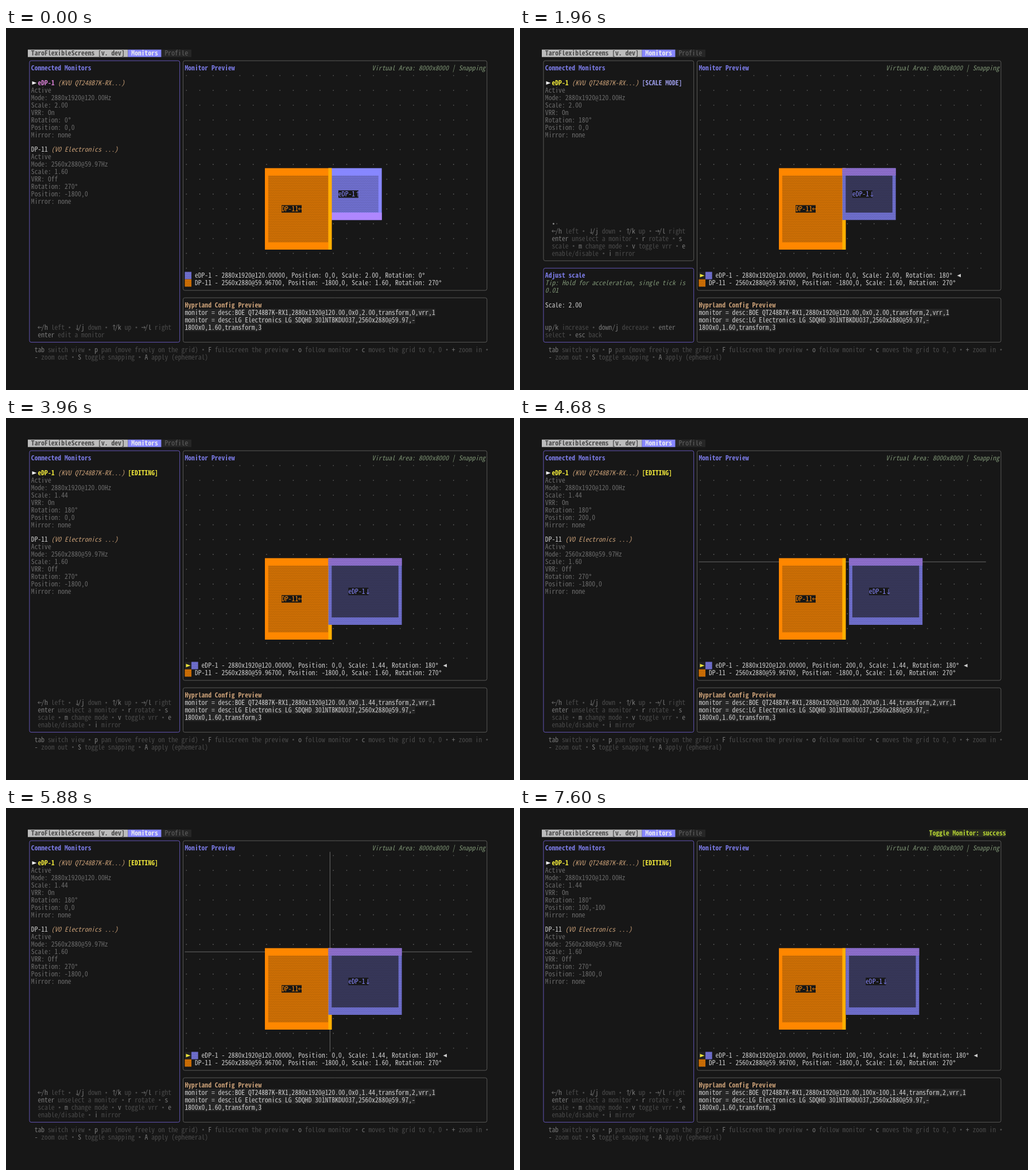
Recreate the animation shown at these times as an HTML page with a canvas. Size 885 by 632 pixels, loop 8000 ms.

```html
<!DOCTYPE html>
<html lang="en">
<head>
<meta charset="utf-8">
<title>Monitor layout</title>
<style>
  html, body { margin: 0; width: 100%; height: 100%; overflow: hidden; background: #171717; }
  canvas { display: block; }
</style>
</head>
<body>
<canvas id="stage" width="885" height="632"></canvas>
<script>
const ctx = document.getElementById('stage').getContext('2d');
const LOOP = 8000;

// Terminal grid
const CW = 5.8175, RH = 12.934, X0 = 38, Y0 = 37.73;
const colX = c => X0 + c * CW;
const rowY = r => Y0 + r * RH;
const midY = r => rowY(r) + RH / 2;

const BG = '#171717', WHITE = '#cecece', GRAY = '#6c6c6c', LINE = '#585856', ACTIVE = '#6355b4';
const BLUE = '#8787ff', VIOLET = '#af87ff', ORANGE = '#ff8700', AMBER = '#ffaf00';
const TITLE = '#7b7be6', TAN = '#c69d75', GREEN = '#7c9273', YELLOW = '#ece43a', KEY = '#787878', DESC = '#4a4a4a';

// Font size follows from the cell width
const FAMILY = '"Noto Sans Mono CJK JP", "Noto Sans Mono", "Liberation Mono", monospace';
ctx.font = '100px ' + FAMILY;
const SIZE = CW / (ctx.measureText('M').width / 100);

const ARROWS = { '→': 0, '↓': 1, '←': 2, '↑': 3 };

function arrow(ch, x, y) {
  const turn = ARROWS[ch], flat = turn % 2 === 0, half = flat ? 3.4 : 4.4;
  ctx.save();
  ctx.translate(x + (flat ? 3.6 : 4.8), y);
  ctx.rotate(turn * Math.PI / 2);
  ctx.beginPath();
  ctx.moveTo(-half, 0);
  ctx.lineTo(half, 0);
  ctx.moveTo(half - 2.4, -2.2);
  ctx.lineTo(half, 0);
  ctx.lineTo(half - 2.4, 2.2);
  ctx.stroke();
  ctx.restore();
}

function dot(x, y, r, open) {
  ctx.beginPath();
  ctx.arc(x, y, r, 0, 7);
  open ? ctx.stroke() : ctx.fill();
}

function glyph(ch, x, y) {
  if (ch in ARROWS) arrow(ch, x, y);
  else if (ch === '•') dot(x + CW / 2, y, 1.5);
  else if (ch === '◦') dot(x + CW / 2, y, 1.1);
  else if (ch === '°') dot(x + CW / 2, y - 3, 1.3, true);
  else if (ch !== ' ') ctx.fillText(ch, x, y + 4.1);
}

function text(c, r, str, color, style = '') {
  ctx.font = `${style} ${SIZE}px ${FAMILY}`;
  ctx.fillStyle = ctx.strokeStyle = color;
  ctx.lineWidth = 0.9;
  [...str].forEach((ch, i) => glyph(ch, colX(c + i), midY(r)));
}

function cells(c, r, w, h, fill) {
  ctx.fillStyle = fill;
  ctx.fillRect(colX(c), rowY(r), w * CW, h * RH);
}

function boxed(c, r, str, color, back, style) {
  cells(c, r, str.length, 1, back);
  text(c, r, str, color, style);
}

// Words between backticks are keys
function help(c, r, str) {
  str.split('`').forEach((part, i) => {
    text(c, r, part, i % 2 ? KEY : DESC);
    c += part.length;
  });
}

function panel(c1, r1, c2, r2, color) {
  ctx.strokeStyle = color;
  ctx.lineWidth = 1;
  ctx.beginPath();
  ctx.roundRect(colX(c1 + 0.5), midY(r1), (c2 - c1) * CW, (r2 - r1) * RH, 3);
  ctx.stroke();
}

function triangle(x, y, w, color) {
  ctx.fillStyle = color;
  ctx.beginPath();
  ctx.moveTo(x, y - 3);
  ctx.lineTo(x + w, y);
  ctx.lineTo(x, y + 3);
  ctx.fill();
}

function rule(x1, y1, x2, y2) {
  ctx.strokeStyle = '#6a6a6a';
  ctx.lineWidth = 1;
  ctx.beginPath();
  ctx.moveTo(x1, y1);
  ctx.lineTo(x2, y2);
  ctx.stroke();
}

// Shaded cells: a tint of the colour with faint zigzag rows of the background
function shade(color, cover) {
  const tile = document.createElement('canvas');
  tile.width = 4;
  tile.height = 3;
  const g = tile.getContext('2d');
  g.fillStyle = BG;
  g.fillRect(0, 0, 4, 3);
  g.globalAlpha = cover;
  g.fillStyle = color;
  g.fillRect(0, 0, 4, 3);
  g.globalAlpha = 0.25;
  g.strokeStyle = BG;
  g.beginPath();
  for (let y = -1.5; y < 6; y += 3) {
    g.moveTo(-2, y + 0.7);
    for (let i = 0; i < 4; i++) g.lineTo(i * 2, y + (i & 1 ? 0.7 : -0.7));
  }
  g.stroke();
  return ctx.createPattern(tile, 'repeat');
}

const LIGHT = 0.3, DENSE = 0.83;
const fills = {
  blueLight: shade(BLUE, LIGHT), blueDense: shade(BLUE, DENSE),
  violetDense: shade(VIOLET, DENSE), orangeDense: shade(ORANGE, DENSE)
};

// Layout units covered by one cell
const UX = 8000 / 86, UY = 8000 / 54;
const ORIGIN_C = 90, ORIGIN_R = 16;
const TURN_ARROW = { 0: '↑', 90: '→', 180: '↓', 270: '←' };

function screen(m, look) {
  const side = m.rot % 180 !== 0;
  const w = Math.ceil((side ? m.h : m.w) / m.scale / UX - 1e-6);
  const h = Math.ceil((side ? m.w : m.h) / m.scale / UY - 1e-6);
  const c = ORIGIN_C + Math.trunc(m.x / UX), r = ORIGIN_R + Math.trunc(m.y / UY);
  cells(c, r, w, h, look.border);
  cells(c + 1, r + 1, w - 2, h - 2, look.inner);
  if (m.rot === 0) cells(c, r + h - 1, w, 1, look.edge);
  if (m.rot === 90) cells(c, r, 1, h, look.edge);
  if (m.rot === 180) cells(c, r, w, 1, look.edge);
  if (m.rot === 270) cells(c + w - 1, r, 1, h, look.edge);

  const lc = c + Math.round(w / 2) - 5, lr = r + Math.floor((h - 1) / 2);
  boxed(lc, lr, m.name + TURN_ARROW[m.rot], look.label, BG);
}

function details(m, r) {
  [m.off ? 'Disabled' : 'Active',
   `Mode: ${m.w}x${m.h}@${m.hz.toFixed(2)}Hz`,
   `Scale: ${m.scale.toFixed(2)}`,
   `VRR: ${m.vrr ? 'On' : 'Off'}`,
   `Rotation: ${m.rot}°`,
   `Position: ${m.x},${m.y}`,
   'Mirror: none'].forEach((s, i) => text(1, r + i, s, GRAY));
}

function legend(m, r, fill, picked) {
  let c = 47;
  if (picked) {
    cells(c, r, 2, 1, '#222222');
    triangle(313.5, midY(r), 8, YELLOW);
    c += 2;
  }
  cells(c, r, 2, 1, fill);
  const s = `${m.name} - ${m.w}x${m.h}@${m.hz.toFixed(5)}, Position: ${m.x},${m.y}, ` +
    `Scale: ${m.scale.toFixed(2)}, Rotation: ${m.rot}°`;
  text(c + 3, r, s, WHITE);
  if (picked) triangle(colX(c + 4 + s.length) + 8.6, midY(r), -6.5, WHITE);
}

// Repeated key presses, 50 ms apart, seen at 25 frames per second
function presses(t, start, max) {
  const now = Math.floor(t / 40) * 40;
  return Math.max(0, Math.min(max, Math.floor((now - start + 20) / 50) + 1));
}

function stateAt(t) {
  const n = presses(t, 2960, 11), last = presses(t, 6400, 4);
  const right = Math.min(last, 2), up = last - right;
  const inner = {
    name: 'eDP-1', w: 2880, h: 1920, hz: 120, vrr: true,
    scale: n === 11 ? 1.44 : 2 - n * (n + 1) / 200,
    rot: t < 880 ? 0 : t < 1440 ? 90 : 180,
    x: 50 * (presses(t, 4520, 4) - presses(t, 5320, 4) + right),
    y: -50 * (presses(t, 4920, 4) - presses(t, 5720, 4) + up),
    off: t >= 7080 && t < 7600
  };
  return {
    inner,
    picked: t >= 360,
    scaling: t >= 1960 && t < 3960,
    moved: t >= 4520,
    toast: t >= 7080
  };
}

const outer = { name: 'DP-11', w: 2560, h: 2880, hz: 59.967, vrr: false, scale: 1.6, rot: 270, x: -1800, y: 0 };

function drawHeader(s) {
  boxed(0, 0, ' TaroFlexibleScreens [v. dev] ', '#4a4a4a', '#bcbcbc', 'bold');
  boxed(30, 0, ' Monitors ', '#ececec', BLUE, 'bold');
  boxed(40, 0, ' Profile ', '#626262', '#262626');
  if (s.toast) boxed(116, 0, 'Toggle Monitor: success', '#b4d233', '#292c20', 'bold');
}

const MOVE_HELP = '`←/h` left • `↓/j` down • `↑/k` up • `→/l` right';

function drawList(s) {
  panel(0, 1, 45, s.scaling ? 28 : 39, s.scaling ? LINE : ACTIVE);
  text(1, 2, 'Connected Monitors', TITLE, 'bold');
  triangle(45.5, midY(4), 8, '#eeeeee');
  text(3, 4, 'eDP-1', s.picked ? YELLOW : '#d07ccd', 'bold');
  text(9, 4, '(KVU QT248B7K-RX...)', TAN, 'italic');
  if (s.scaling) text(30, 4, '[SCALE MODE]', '#9898e2', 'bold');
  else if (s.picked) text(30, 4, '[EDITING]', YELLOW, 'bold');
  details(s.inner, 5);
  if (!s.scaling) {
    text(1, 13, 'DP-11', WHITE);
    text(7, 13, '(VO Electronics ...)', TAN, 'italic');
    details(outer, 14);
  }
  if (!s.picked) {
    help(3, 37, MOVE_HELP);
    help(3, 38, '`enter` edit a monitor');
    return;
  }
  const r = s.scaling ? 24 : 35;
  [MOVE_HELP,
   '`enter` unselect a monitor • `r` rotate • `s`',
   'scale • `m` change mode • `v` toggle vrr • `e`',
   'enable/disable • `i` mirror'].forEach((line, i) => help(3, r + i, line));
  if (s.scaling) {
    text(3, 23, '•', '#8a8a8a');
    text(4, 23, '◦', DESC);
    drawScale(s);
  }
}

function drawScale(s) {
  panel(0, 29, 45, 39, ACTIVE);
  text(1, 30, 'Adjust scale', TITLE, 'bold');
  text(1, 31, 'Tip: Hold for acceleration, single tick is', GREEN, 'italic');
  text(1, 32, '0.01', GREEN, 'italic');
  text(1, 34, `Scale: ${s.inner.scale.toFixed(2)}`, WHITE);
  help(1, 37, '`up/k` increase • `down/j` decrease • `enter`');
  help(1, 38, 'select • `esc` back');
}

function drawPreview(s) {
  const m = s.inner;
  panel(46, 1, 137, 32, LINE);
  text(47, 2, 'Monitor Preview', TITLE, 'bold');
  text(103, 2, 'Virtual Area: 8000x8000 | Snapping', GREEN, 'italic');
  ctx.fillStyle = '#606060';
  for (let r = 3; r < 30; r += 2)
    for (let c = 47; c < 133; c += 4) dot(colX(c + 0.5), midY(r), 0.85);

  if (s.moved && !m.off) {
    const gy = midY(ORIGIN_R), gx = colX(ORIGIN_C + 0.5);
    if (m.y === 0) rule(colX(47), gy, colX(133), gy);
    if (m.x === 0) rule(gx, rowY(3), gx, rowY(30));
  }

  const drawOuter = () => screen(outer, { border: ORANGE, inner: fills.orangeDense, edge: AMBER, label: ORANGE });
  if (s.picked) {
    drawOuter();
    if (!m.off) screen(m, { border: fills.blueDense, inner: fills.blueLight, edge: fills.violetDense, label: BLUE });
  } else {
    screen(m, { border: BLUE, inner: fills.blueDense, edge: VIOLET, label: BLUE });
    drawOuter();
  }

  if (!m.off) legend(m, 30, fills.blueDense, s.picked);
  legend(outer, m.off ? 30 : 31, fills.orangeDense, false);
}

function drawConfig({ inner: m }) {
  panel(46, 33, 137, 39, LINE);
  text(47, 34, 'Hyprland Config Preview', TAN, 'bold');
  const mode = `${m.w}x${m.h}@${m.hz.toFixed(2)},${m.x}x${m.y},${m.scale.toFixed(2)},transform,${m.rot / 90},vrr,1`;
  ['monitor = desc:BOE QT248B7K-RX1,' + (m.off ? 'disable' : mode),
   'monitor = desc:LG Electronics LG SDQHD 301NTBKDU037,2560x2880@59.97,-',
   '1800x0,1.60,transform,3'].forEach((line, i) => boxed(47, 35 + i, line, WHITE, '#262626'));
}

function drawFooter() {
  help(2, 40, '`tab` switch view • `p` pan (move freely on the grid) • `F` fullscreen the preview • ' +
    '`o` follow monitor • `c` moves the grid to 0, 0 • `+` zoom in •');
  help(2, 41, '`-` zoom out • `S` toggle snapping • `A` apply (ephemeral)');
}

function frame() {
  const s = stateAt(performance.now() % LOOP);
  ctx.fillStyle = BG;
  ctx.fillRect(0, 0, 885, 632);
  drawHeader(s);
  drawList(s);
  drawPreview(s);
  drawConfig(s);
  drawFooter();
  requestAnimationFrame(frame);
}
frame();
</script>
</body>
</html>
```
